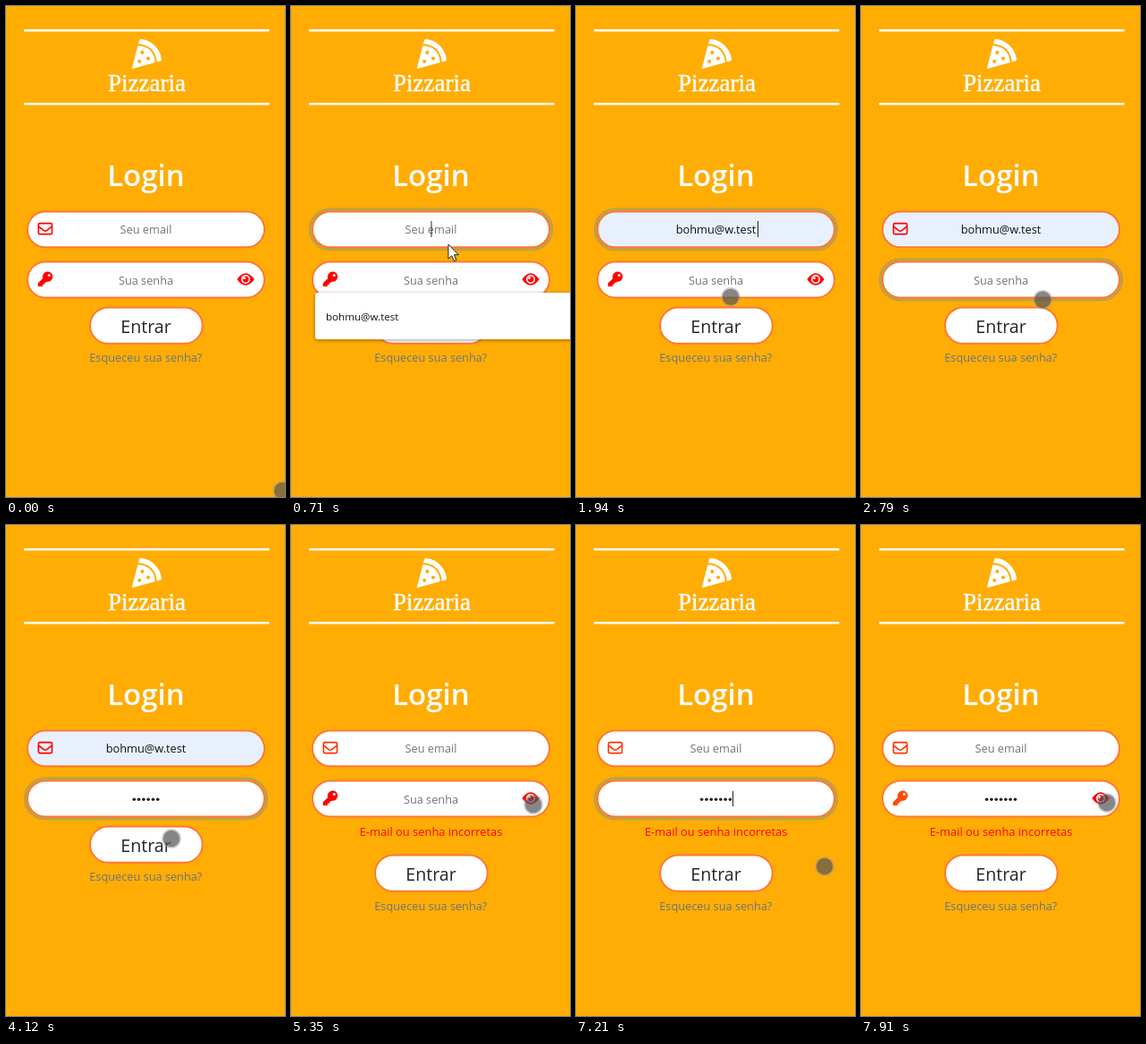
Write an HTML page that moves like this. It is 312 px wide and 548 px high and loops after 7990 ms.

```html
<!DOCTYPE html>
<html lang="pt-BR">
<head>
<meta charset="utf-8">
<title>Login</title>
<style>
  html, body { margin: 0; width: 100%; height: 100%; overflow: hidden; background: #ffad05; }
  svg { display: block; width: 312px; height: 548px; }
  text { font: 12.75px "Open Sans", "Noto Sans", sans-serif; text-anchor: middle; fill: #111; }
  .hint { fill: #6c757d; }
  .box { fill: #fff; stroke: #ff7733; stroke-width: 2; }
  .ring { fill: none; stroke: rgba(0, 123, 255, .25); stroke-width: 3.2; }
  .caret { fill: #222; }
  .icon { fill: #f00; fill-rule: evenodd; }
</style>
</head>
<body>
<svg viewBox="0 0 312 548">
  <path d="M20 27.2H294.5M20 109.3H294.5" stroke="#fff" stroke-width="2.5"/>
  <g transform="translate(141 37) scale(.0643)">
    <path fill="#fff" d="M159 0C143 -1 128 8 124 24L109 81C296 86 423 211 431 398L488 382C504 377 514 362 512 346C491 165 341 17 159 0Z
      M100 112L0 492A16 16 0 0 0 20 511L400 406C395 231 276 114 100 112Z"/>
    <g fill="#ffad05"><circle cx="128" cy="384" r="32"/><circle cx="176" cy="232" r="32"/><circle cx="280" cy="336" r="32"/></g>
  </g>
  <text x="157.5" y="95" style="font:27px 'Liberation Serif',serif;fill:#fff;stroke:#fff;stroke-width:.45">Pizzaria</text>
  <text x="156.5" y="201" style="font-size:33px;font-weight:600;fill:#fff">Login</text>

  <rect class="ring" id="emailRing" x="21.4" y="226.9" width="270.2" height="44.7" rx="22.3"/>
  <rect class="box" id="emailBox" x="24" y="229.5" width="265" height="39.8" rx="19.9"/>
  <text class="hint" id="emailHint" x="156.5" y="254">Seu email</text>
  <text id="emailPreview" x="156.5" y="254" style="font:11px 'Liberation Sans',sans-serif">bohmu@w.test</text>
  <text id="emailValue" x="156.5" y="254">bohmu@w.test</text>
  <rect class="caret" id="emailCaret" y="240" width="1" height="18"/>
  <g id="envelope" fill="none" stroke="#f00" stroke-width="1.6" stroke-linejoin="round">
    <rect x="36.3" y="242.6" width="15.2" height="12" rx="1.5"/>
    <path d="M36.3 246L42.3 250.6Q43.9 251.7 45.5 250.6L51.5 246"/>
  </g>

  <rect class="ring" id="passRing" x="21.4" y="282.9" width="270.2" height="45" rx="22.5"/>
  <rect class="box" x="24" y="285.5" width="265" height="40" rx="20"/>
  <text class="hint" id="passHint" x="156.5" y="311">Sua senha</text>
  <g id="dots" fill="#222"></g>
  <rect class="caret" id="passCaret" y="297" width="1" height="17"/>
  <g id="passIcons">
    <path class="icon" id="key" transform="translate(35.7 296.3) scale(1.04)" d="M16 5.5A5.5 5.5 0 0 1 9.5 10.9L8.4 12H7V14H5V16H.6L0 15.4V12.7L5.3 7.4A5.5 5.5 0 1 1 16 5.5Z
      M12 2.5A1.5 1.5 0 1 0 12 5.5A1.5 1.5 0 1 0 12 2.5Z"/>
    <path class="icon" d="M258.3 305Q268 291.4 277.7 305Q268 318.6 258.3 305Z"/>
    <circle cx="268" cy="305" r="4.2" fill="#f00" stroke="#fff" stroke-width="1.6"/>
    <circle cx="266.5" cy="303.5" r="1.5" fill="#fff"/>
  </g>

  <text id="error" x="156.5" y="347" style="font-size:12.9px;fill:#f00">E-mail ou senha incorretas</text>
  <g id="button">
    <rect class="box" x="94" y="336.5" width="125.7" height="40.3" rx="20.1"/>
    <text x="156.5" y="365" style="font-size:19.6px;fill:#212529">Entrar</text>
  </g>
  <text class="hint" id="forgot" x="156.3" y="397">Esqueceu sua senha?</text>

  <g id="menu">
    <rect x="27" y="320" width="300" height="52" rx="3" fill="#fff" style="filter:drop-shadow(0 1px 2px rgba(0,0,0,.4))"/>
    <rect id="menuRow" x="27" y="328" width="300" height="36" fill="#d8e1e9"/>
    <text x="39" y="351" style="font-size:11.6px;font-weight:500;text-anchor:start">bohmu@w.test</text>
  </g>

  <g id="pointer">
    <g id="touch">
      <circle r="10.8" fill="rgba(150,150,150,.5)"/>
      <circle r="9.2" fill="rgba(40,40,40,.42)"/>
    </g>
    <path id="arrow" d="M0 0V16L3.8 12.6L6.4 18.6L9 17.5L6.5 11.6H11.4Z" fill="#fff" stroke="#222"/>
  </g>
</svg>
<script>
const LOOP = 7990;
const $ = id => document.getElementById(id);
const show = (id, on) => { $(id).style.display = on ? '' : 'none'; };
const move = (id, x, y) => $(id).setAttribute('transform', `translate(${x} ${y})`);

const T = { emailFocus: 630, menuOpen: 710, hover: 1020, pick: 1640, passFocus: 2300,
            submit: 4580, reply: 4970, passAgain: 6200, blur: 7400 };

// Pointer stops: time, x, y
const path = [
  [0, 309, 541], [70, 309, 541], [630, 180, 262], [790, 172, 270], [1170, 137, 330],
  [1560, 128, 340], [1700, 128, 340], [2200, 223, 308], [2650, 223, 308], [2800, 203, 328],
  [2950, 201, 330], [3420, 201, 330], [3800, 190, 356], [4120, 185, 350], [4930, 185, 350],
  [5200, 285, 318], [5350, 271, 312], [5860, 271, 312], [6300, 242, 308], [6690, 242, 308],
  [7150, 278, 381], [7360, 278, 381], [7880, 275, 310], [LOOP, 275, 310]
];
const keyTimes = [
  [3100, 3180, 3270, 3420, 3500, 3660],
  [6510, 6670, 6750, 6830, 6920, 7000, 7080]
];

function pointerAt(t) {
  const i = path.findIndex(p => p[0] > t);
  const [t0, x0, y0] = path[i - 1], [t1, x1, y1] = path[i];
  const u = (t - t0) / (t1 - t0), k = u * u * (3 - 2 * u);
  return [x0 + (x1 - x0) * k, y0 + (y1 - y0) * k];
}

function draw(t) {
  const within = (a, b) => t >= a && t < b;
  const failed = t >= T.reply;
  const emailFocus = within(T.emailFocus, T.passFocus);
  const passFocus = within(T.passFocus, T.submit) || within(T.passAgain, T.blur);
  const preview = within(T.hover, T.pick), filled = within(T.pick, T.reply);
  const menu = within(T.menuOpen, T.pick);
  const typed = keyTimes[failed ? 1 : 0].filter(k => k <= t).length;

  show('emailRing', emailFocus);
  show('envelope', !emailFocus);
  show('emailHint', !preview && !filled);
  show('emailPreview', preview);
  show('emailValue', filled);
  $('emailBox').style.fill = preview || filled ? '#e8f0fe' : '#fff';
  $('envelope').style.stroke = failed ? '#ff3300' : '#f00';
  show('emailCaret', within(T.emailFocus, T.pick) || within(1710, 2100));
  $('emailCaret').setAttribute('x', filled ? 203 : 156.5);

  show('passRing', passFocus);
  show('passIcons', !passFocus);
  show('passHint', !typed);
  $('key').style.fill = t >= T.blur ? '#ff4a00' : '#f00';
  $('dots').innerHTML = Array.from({ length: typed }, (_, i) =>
    `<circle cx="${156.5 + (i - (typed - 1) / 2) * 5.3}" cy="306.3" r="1.8"/>`).join('');
  show('passCaret', passFocus && !within(2720, 2950) && !within(4120, 4430));
  $('passCaret').setAttribute('x', Math.round(156.5 + typed * 2.65));

  show('error', failed);
  move('button', 0, failed ? 32 : 0);
  move('forgot', 0, failed ? 33 : 0);
  show('menu', menu);
  show('menuRow', preview);
  show('arrow', menu);
  show('touch', !menu);
  move('pointer', ...pointerAt(t));
}

const start = performance.now();
function tick() {
  draw((performance.now() - start) % LOOP);
  requestAnimationFrame(tick);
}
tick();
</script>
</body>
</html>
```
